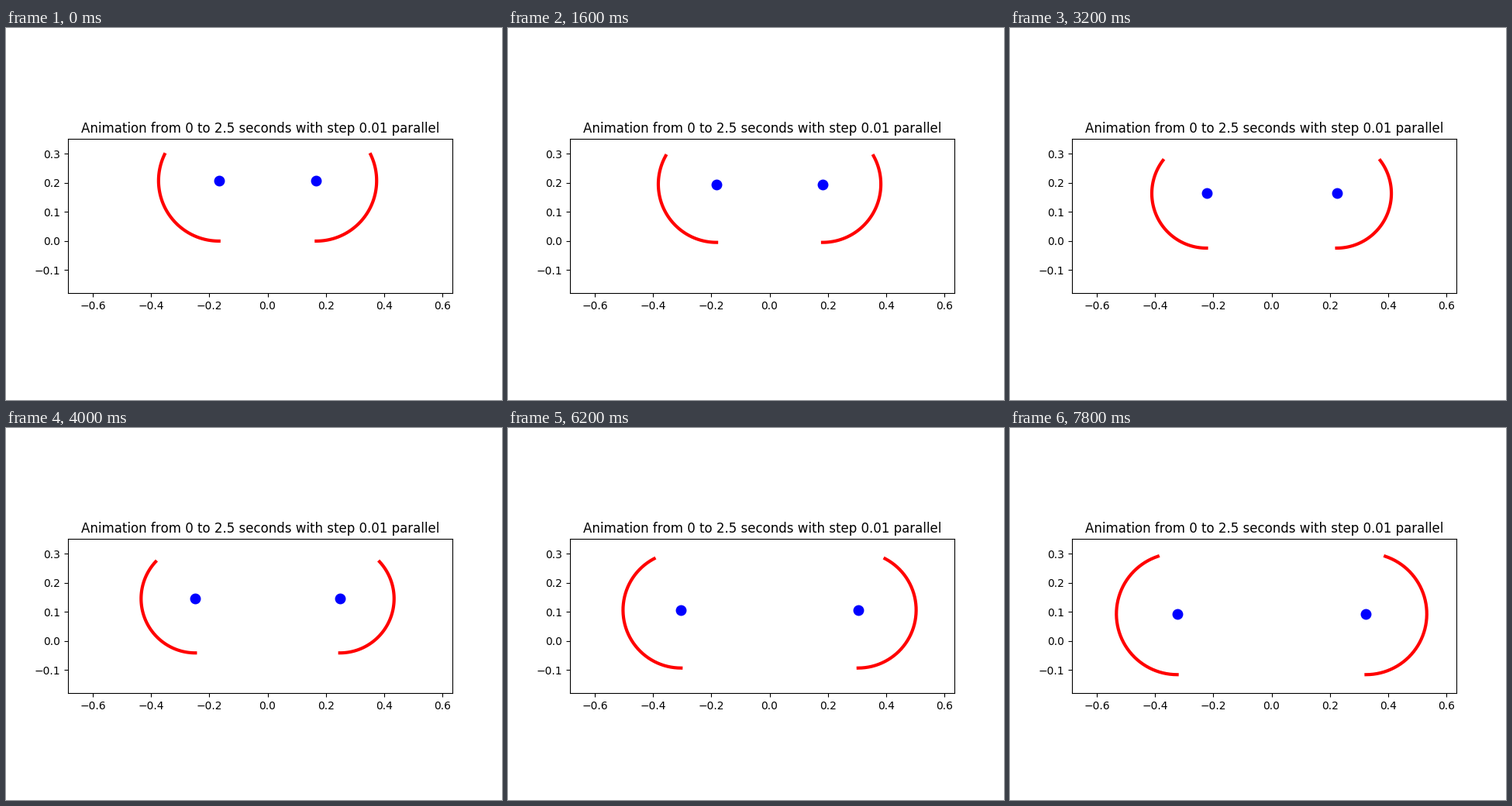
A matplotlib script for the animation above (8000 ms loop, 640x480 px).

```python
import numpy as np
import matplotlib.pyplot as plt
from matplotlib.animation import FuncAnimation

FRAMES = 40
DT = 0.01
MASS, PRESSURE, GRAVITY = 100, 2000, 10
HALF_BEAM, START_HEIGHT = 0.353, 0.3
HALF_LENGTH = 3 * np.pi / 16      # half of the constant membrane length
ARC_STEP = 0.02


def side_radius(tilt):
    """Radius that keeps the membrane length constant at this tilt."""
    return (HALF_LENGTH - HALF_BEAM) / (np.pi / 2 + tilt - np.cos(tilt))


def solve_shape(height):
    """Find the arc centre (x, y) and its end angle for a beam height."""
    low, high = 0.0, np.pi / 2
    for _ in range(50):
        tilt = (low + high) / 2
        if side_radius(tilt) * (1 + np.sin(tilt)) > height:
            low = tilt
        else:
            high = tilt
    y = side_radius(tilt)
    return HALF_BEAM - y * np.cos(tilt), y, tilt


def simulate():
    """Explicit Euler motion of the beam resting on the membrane."""
    shapes, height, speed = [], START_HEIGHT, 0.0
    for _ in range(FRAMES):
        x, y, tilt = solve_shape(height)
        shapes.append((x, y, tilt))
        force = PRESSURE * 2 * x - MASS * GRAVITY
        height += speed * DT
        speed += force / MASS * DT
    return shapes


shapes = simulate()

plt.rcParams["text.kerning_factor"] = 6
fig, ax = plt.subplots(figsize=(6.4, 4.8), dpi=100)
ax.set_aspect("equal")
ax.set_xlim(-0.686, 0.6352)
ax.set_ylim(-0.1784, 0.3516)
ax.set_title("Animation from 0 to 2.5 seconds with step 0.01 parallel")

arcs = [ax.plot([], [], color="red", lw=3)[0] for _ in range(2)]
dots = [ax.plot([], [], "o", color="blue", ms=9)[0] for _ in range(2)]


def update(frame):
    x, y, tilt = shapes[frame]
    radius = np.hypot(HALF_BEAM - x, START_HEIGHT - y)
    angle = np.arange(-np.pi / 2, tilt, ARC_STEP)
    for side, arc, dot in zip((-1, 1), arcs, dots):
        arc.set_data(side * (x + radius * np.cos(angle)),
                     y + radius * np.sin(angle))
        dot.set_data([side * x], [y])
    return arcs + dots


anim = FuncAnimation(fig, update, frames=FRAMES, interval=200,
                     repeat=True, repeat_delay=0)
plt.show()
```
